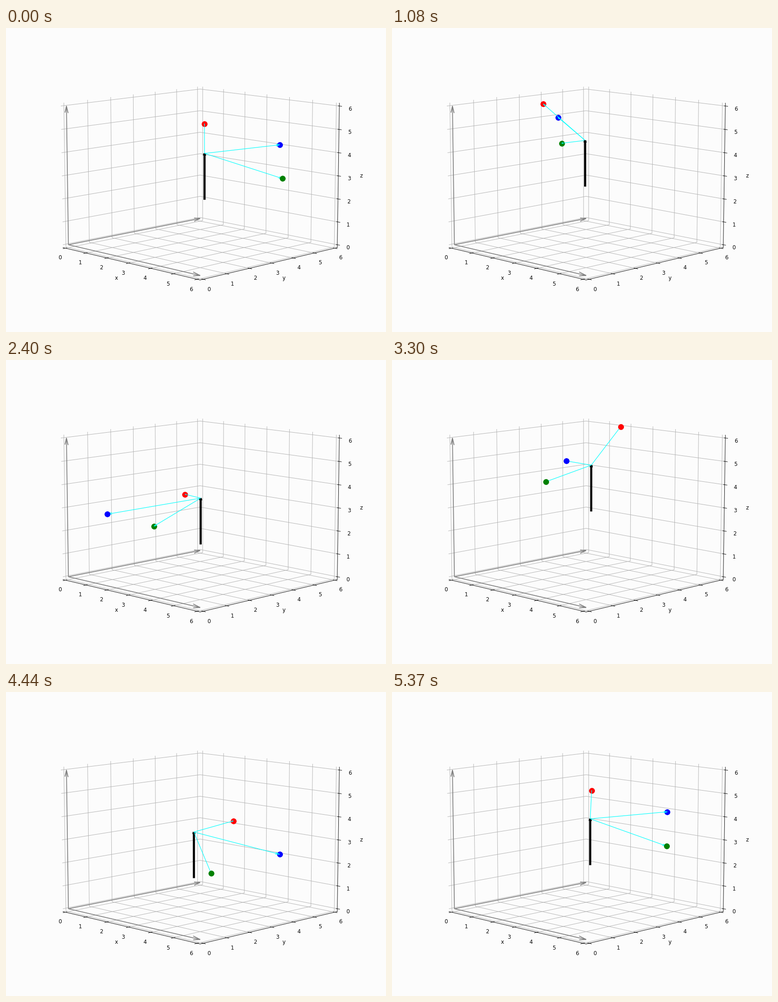
These frames come from a looping animation (837 by 669 pixels, 5400 ms). A matplotlib script:

```python
import numpy as np
import matplotlib.pyplot as plt
from matplotlib.animation import FuncAnimation

FRAMES = 180
BG = "#fcfcfc"
HEAD = 0.05

fig = plt.figure(figsize=(10.009, 8), dpi=83.625, facecolor=BG)
ax = fig.add_axes([0, 0, 1, 1], projection="3d", facecolor=BG)
ax.view_init(elev=10, azim=-45)

pad = 6 / 48
ticks = range(7)
ax.set(xlim=(-pad, 6 + pad), ylim=(-pad, 6 + pad), zlim=(-pad, 6 + pad),
       xticks=ticks, yticks=ticks, zticks=ticks,
       xlabel="x", ylabel="y", zlabel="z")
for axis in (ax.xaxis, ax.yaxis, ax.zaxis):
    axis.set_pane_color((1, 1, 1, 0))
    axis.pane.set_edgecolor((1, 1, 1, 0))
ax.yaxis.pane.set_edgecolor("#f0f0f0")


def arrow(start, vec, color, lw):
    return ax.quiver(*start, *vec, color=color, linewidth=lw,
                     arrow_length_ratio=HEAD)


def ball(pos, color):
    return ax.scatter(*[[c] for c in pos], s=100, c=color, depthshade=False)


def spin(x, y, a):
    """Rotate (x, y) about the vertical axis by angle a."""
    return x * np.cos(a) - y * np.sin(a), x * np.sin(a) + y * np.cos(a)


for direction in 6 * np.eye(3):
    arrow((0, 0, 0), direction, "gray", 1.5)

moving = []


def update(i):
    while moving:
        moving.pop().remove()

    a = 2 * np.pi * i / FRAMES
    c, s = np.cos(2 * a), np.sin(2 * a)
    hub = np.array([3 + 0.2 * c, 3 + 0.2 * s, 4 + 0.83 * s])

    # ball offsets from the hub, turning with it
    offsets = {
        "red": (*spin(-1, 1, a), 1 + 0.835 * s),
        "blue": (*spin(0.5, 3, a), 0.77 * s),
        "green": (*spin(1 + c, 1.5 + s, a), -1 + 0.807 * s),
    }
    moving.append(arrow(hub - [0, 0, 2], (0, 0, 2), "black", 4))
    for color, off in offsets.items():
        off = np.array(off)
        moving.append(arrow(hub, off, "cyan", 1))
        moving.append(ball(hub + off, color))
    return moving


anim = FuncAnimation(fig, update, frames=FRAMES, interval=30,
                     init_func=lambda: [], repeat=True, repeat_delay=0,
                     blit=False)
plt.show()
```
